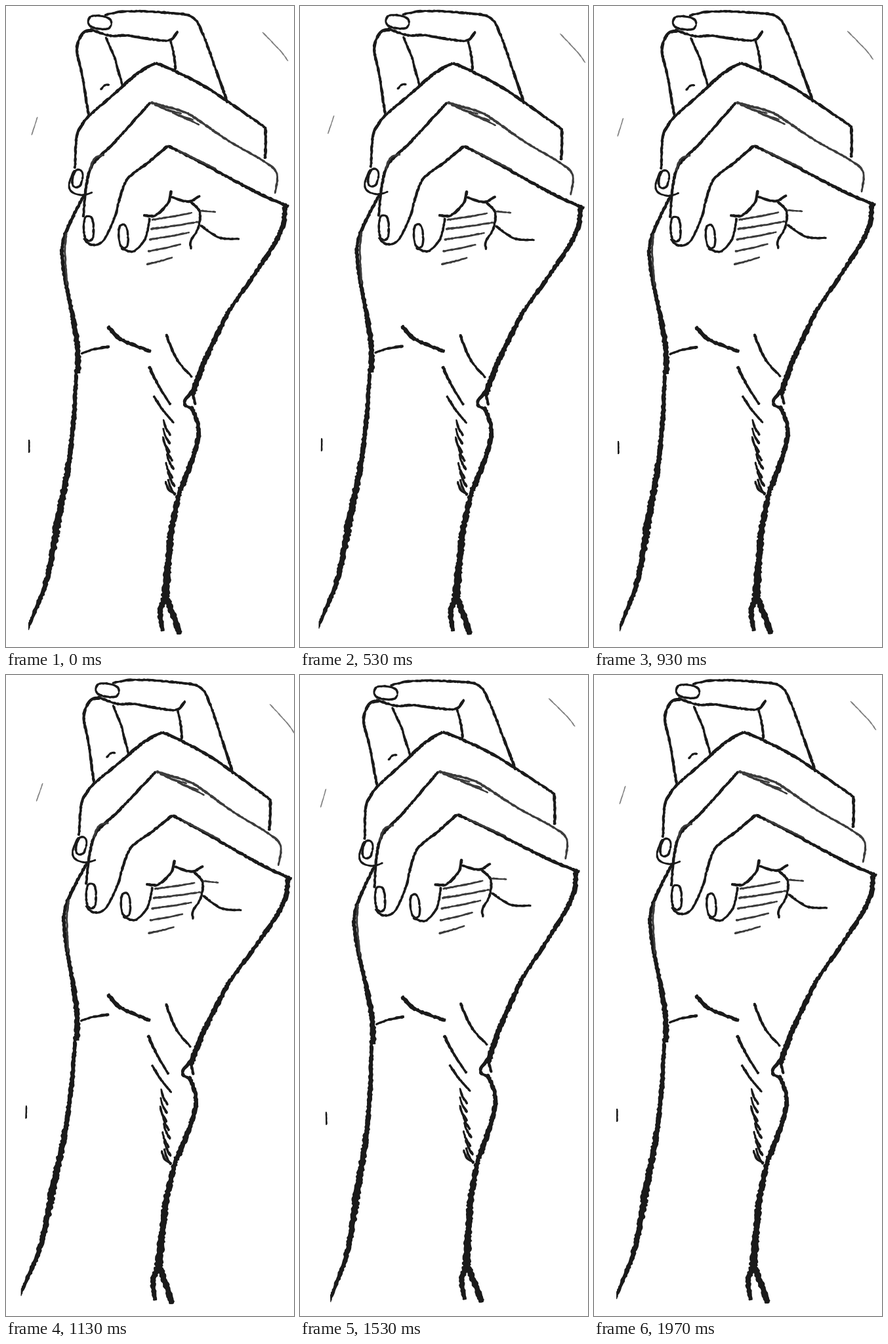
These frames come from a looping animation (439 px wide and 977 px high, 2.01 s). An HTML page:

```html
<!DOCTYPE html>
<html lang="en">
<head>
<meta charset="utf-8">
<title>Swaying hand</title>
<style>
  html, body { margin: 0; width: 100%; height: 100%; overflow: hidden; background: #fff; }
  svg { display: block; width: 439px; height: 977px; }
</style>
</head>
<body>
<svg viewBox="0 0 439 977">
  <clipPath id="sheet"><rect x="34" y="0" width="398" height="958"/></clipPath>
  <g id="hand"><g id="art" clip-path="url(#sheet)"></g></g>
</svg>
<script>
const hand = document.getElementById("hand");
const art = document.getElementById("art");
const BLACK = "#1a1a1a", SOFT = "#3c3c3c", PALE = "#808080";

let seed = 7;
const rand = () => (seed = (seed * 16807) % 2147483647) / 2147483647;
const jitter = r => (rand() * 2 - 1) * r;

const spline = (a, b, c, d, t) =>
  b + t * (c - a + t * (2 * a - 5 * b + 4 * c - d + t * (3 * (b - c) + d - a))) / 2;

// Rough pen line through the points, its width going from w0 to w1.
function ink(points, w0 = 4, w1 = w0, color = BLACK) {
  const n = points.split(/[ ,]/).map(Number), last = n.length / 2 - 1;
  const at = (i, k) => n[2 * Math.max(0, Math.min(last, i)) + k];
  const course = [];
  for (let i = 0; i < last; i++) {
    const steps = Math.max(2, Math.round(Math.hypot(at(i + 1, 0) - at(i, 0), at(i + 1, 1) - at(i, 1)) / 2.5));
    for (let s = i ? 1 : 0; s <= steps; s++)
      course.push([0, 1].map(k => spline(at(i - 1, k), at(i, k), at(i + 1, k), at(i + 2, k), s / steps)));
  }
  const left = [], right = [], end = course.length - 1;
  course.forEach(([x, y], i) => {
    const p = course[Math.max(0, i - 1)], q = course[Math.min(end, i + 1)];
    const dx = q[0] - p[0], dy = q[1] - p[1], len = Math.hypot(dx, dy) || 1;
    const w = (w0 + (w1 - w0) * i / end) / 2 * (i % end ? 1 : 0.6);
    const side = k => {
      const r = k * w * (1 + jitter(0.28));
      return (x - dy / len * r).toFixed(1) + " " + (y + dx / len * r).toFixed(1);
    };
    left.push(side(1));
    right.unshift(side(-1));
  });
  const path = document.createElementNS("http://www.w3.org/2000/svg", "path");
  path.setAttribute("d", "M" + left.concat(right).join("L") + "Z");
  path.setAttribute("fill", color);
  art.append(path);
}

// Nail: a squarish loop around x, y, tilted by some degrees.
function nail(x, y, rx, ry, tilt) {
  const c = Math.cos(tilt * Math.PI / 180), s = Math.sin(tilt * Math.PI / 180), loop = [];
  for (let i = 0; i <= 12; i++) {
    const a = i * Math.PI / 6, soft = v => Math.sign(v) * Math.abs(v) ** 0.8;
    const u = rx * soft(Math.cos(a)), v = ry * soft(Math.sin(a));
    loop.push(x + u * c - v * s, y + u * s + v * c);
  }
  ink(loop.join(" "), 3.4);
}

// Index finger and thumb
nail(143, 25, 18, 10, 8);
ink("150,14 185,8 255,11 284,17 299,40 322,103 338,148", 3.6, 4.2);
ink("128,35 157,45 185,45 225,51 250,52 262,38", 4);
ink("251,53 257,80 258,98", 4);
ink("133,37 118,41 108,65 116,105 126,166", 4.5, 4);
ink("152,47 166,80 169,92 178,122", 3.4, 4);
ink("144,128 150,121 158,120", 3.2);

// Middle finger
ink("112,188 126,168 165,134 200,103 228,87", 4, 5);
ink("228,87 255,98 310,127 395,185", 5, 4);
ink("395,184 396,205 395,233", 4.4);
ink("120,174 108,198 105,248", 4);
nail(109, 263, 7.5, 13.5, 12);
ink("104,250 96,274 103,285 118,288 132,284", 3);

// Ring finger
ink("124,264 133,240 165,208 220,147", 4.5, 4);
ink("128,250 135,232 150,227", 3.5, 3, SOFT);
ink("220,147 270,161 293,174 340,206 395,238 413,256 410,286", 4, 3.2, SOFT);
for (let i = 0; i < 6; i++) {
  const x = 226 + 9 * i, y = 150 + 4 * i;
  ink(`${x},${y} ${x + 24},${y + 8 + jitter(4)}`, 3.4, 2.4, SOFT);
}
ink("125,258 121,285 118,322", 4);
nail(126, 339, 7.5, 19, -2);
ink("118,354 130,364 149,357 167,318 171,300", 3.6);

// Little finger
ink("171,301 185,264 215,240 247,213", 3.8, 4.6);
ink("247,213 300,240 380,283 431,306", 4.6, 5);
ink("262,220 320,248", 3.2, 2.4, SOFT);
nail(179, 351, 7, 18, -4);
ink("175,369 194,374 212,355 219,323", 3.6);

// Palm
ink("209,319 228,319 247,300 252,281", 4);
ink("249,290 278,298 296,289", 3.8);
ink("281,298 295,313 293,338 282,358 282,371", 3.8);
ink("296,312 320,314", 3, 2.4, SOFT);
ink("296,334 325,353 356,355", 3.8);
for (let i = 0; i < 5; i++) {
  const x = 222 - 2 * i, y = 326 + 13 * i + i * i, len = 73 - 11 * Math.abs(i - 1);
  ink(`${x},${y} ${x + len / 2},${y - 5} ${x + len},${y - 11}`, 3.4, 2.6, SOFT);
}

// Right edge of hand and arm
ink("426,305 420,340 395,385 338,467", 8, 5.5);
ink("340,464 315,515 297,555 284,594", 7, 9);
ink("287,582 272,605 286,615", 6, 4.5);
ink("284,590 289,608", 4);
ink("282,610 293,640 289,675 266,738", 6, 9);
ink("266,735 252,800 246,865 242,908", 7.5, 12);
ink("241,904 235,925 239,953", 9, 7);
ink("244,900 256,932 265,958", 9);

// Left edge of hand and arm
ink("119,289 104,317 88,355 87,395 105,490", 4.5, 7);
ink("92,346 90,375 93,425", 3, 3, SOFT);
ink("101,470 109,520 110,560", 8, 8.5);
ink("107,553 104,620 95,700 75,805", 5.5, 11);
ink("77,798 61,878 32,951", 11, 5);

// Wrist
ink("155,488 175,508 221,527", 6.5, 5);
ink("114,530 135,523 158,519", 3, 4.4);
ink("244,500 260,538 284,566", 4.4, 3.4);
ink("218,549 232,578 251,608", 4.6, 3.6);
ink("225,594 240,617 256,636", 4, 3.4);
for (let i = 0; i < 8; i++) {
  const x = 238 + 1.4 * i + jitter(2), y = 630 + 13 * i;
  ink(`${x},${y} ${x + 4},${y + 13} ${x + 11},${y + 25}`, 3.2, 3.8);
}
ink("243,724 248,737 259,744", 3.6);

// Stray marks
ink("35,661 35,681", 3);
ink("391,40 418,68 430,84", 1.8, 1.8, PALE);
ink("48,169 39,197", 1.6, 1.6, PALE);

// Sway in degrees at share p of the cycle: lean and hold, swing, settle
function sway(p) {
  if (p < 0.2) return Math.min(2, 20 * p);
  if (p < 0.8) return 4 * Math.abs((p - 0.2) / 0.4 % 1 * 2 - 1) - 2;
  return 10 * (p - 1);
}

const LOOP = 2010, STEP = 40, RESUME = 410;
const start = performance.now();
function tick() {
  const t = (performance.now() - start) % LOOP;
  const pose = t < RESUME ? Math.min(9, Math.floor(t / STEP)) : 10 + Math.floor((t - RESUME) / STEP);
  hand.setAttribute("transform", `rotate(${sway(pose / 49)} 219.5 488.5)`);
  requestAnimationFrame(tick);
}
tick();
</script>
</body>
</html>
```
